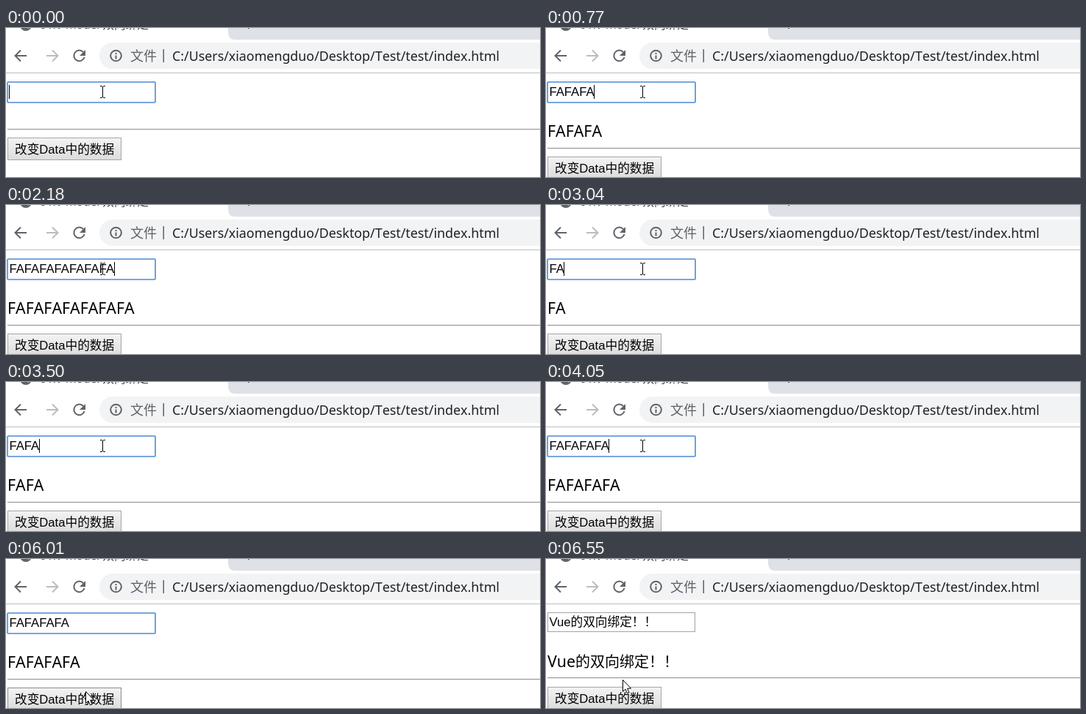
Recreate the animation shown at these times as an HTML page. Size 726 by 204 pixels, loop 7.01 s.

```html
<!DOCTYPE html>
<html lang="zh-CN">
<head>
<meta charset="utf-8">
<title>v-model</title>
<style>
  html, body { margin: 0; width: 100%; height: 100%; overflow: hidden; background: #fff; }
  svg { display: block; }
  text { white-space: pre; }
  .ui { font-family: "Noto Sans", "Noto Sans CJK SC", "Noto Sans CJK", sans-serif; font-kerning: none; }
  .form { font: 16.667px "Liberation Sans", "Noto Sans CJK SC", "Noto Sans CJK", sans-serif; }
  .icon { fill: none; stroke: #5f6368; stroke-width: 2; }
  .solid { fill: #5f6368; }
</style>
</head>
<body>
<svg width="726" height="204" viewBox="0 0 726 204">
  <defs>
    <linearGradient id="face" x2="0" y2="1">
      <stop stop-color="#f3f3f3"/><stop offset="1" stop-color="#dcdcdc"/>
    </linearGradient>
    <path id="back" d="M15 0H0M7 -7.5L-.5 0 7 7.500"/>
  </defs>

  <!-- browser frame -->
  <path d="M302 0V6Q302 16 312 16H726V0Z" fill="#dee1e6"/>
  <path d="M329 0h2v1h-2z" class="solid"/>
  <circle cx="27" cy="-4" r="7" class="icon"/>
  <path d="M22 0l4-3 5 2-2 4h-4z" class="solid"/>
  <text x="46" y="1" class="ui" font-size="15.6" fill="#45494d">01.v-model 双向绑定</text>
  <use href="#back" x="13" y="38" class="icon"/>
  <use href="#back" class="icon" style="stroke:#babcbe" transform="translate(70 38) scale(-1 1)"/>
  <path d="M105 33A7.3 7.3 0 1 0 106.6 40" class="icon"/>
  <path d="M108 30v8h-8z" class="solid"/>
  <rect x="127" y="20" width="640" height="36" rx="18" fill="#f1f3f4"/>
  <circle cx="149.500" cy="38" r="7.300" class="icon"/>
  <path d="M148.500 34h2v2h-2zm0 3.500h2v5h-2z" class="solid"/>
  <text x="169" y="45" class="ui solid" font-size="18">文件</text>
  <path d="M213.500 29h1.500v18h-1.500z" class="solid"/>
  <text x="226" y="45" class="ui" font-size="17.84" fill="#202124">C:/Users/xiaomengduo/Desktop/Test/test/index.html</text>
  <path d="M0 61h726v1H0z" fill="#bcbcbc"/>

  <!-- page -->
  <rect id="box" fill="#fff"/>
  <text id="value" x="4.5" class="form"></text>
  <rect id="caret" y="78" width="1" height="19"/>
  <text id="echo" x="2" class="ui" font-size="21.3"></text>
  <g id="rule">
    <path d="M2 0H726v1H2z" fill="#979797"/>
    <path d="M2 1H726v1H2z" fill="#ececec"/>
  </g>
  <g id="button" stroke="#a6a6a6">
    <rect x="2.500" y=".5" width="154" height="30" fill="url(#face)"/>
    <text x="12" y="22" class="form" stroke="none">改变Data中的数据</text>
  </g>

  <!-- pointers -->
  <path id="beam" d="M-3 -7.500H-1L.5 -6.500 2 -7.500H4M.5 -6.500V7.500M-3 8.500H-1L.5 7.500 2 8.500H4" fill="none" stroke="#000"/>
  <path id="arrow" d="M.5 .5V16.500L4 13.200 6.500 19 9 18 6.600 12.200H11.500Z" fill="#fff" stroke="#000"/>
</svg>
<script>
const LOOP = 7010, TICK = 77.8;
const TYPED = 24, ERASE = 34, RETYPE = 40, RETYPED = 52, BLUR = 79, CLICK = 80;

const $ = id => document.getElementById(id);
const set = (id, attrs) => {
  for (const k in attrs) $(id).setAttribute(k, attrs[k]);
};
const place = (id, x, y) => set(id, { transform: `translate(${x} ${y})` });
const show = (id, on) => set(id, { visibility: on ? "visible" : "hidden" });

// F and A are struck in turn, each at a steady pace.
const presses = ticks => Math.max(0, Math.ceil(ticks / 3.3));
const burst = (tick, f, a, max) => Math.min(max, presses(tick - f) + presses(tick - a));

function letters(tick) {
  if (tick > RETYPE) return burst(tick - RETYPE, 0.05, 1.45, 8);
  if (tick > ERASE) return Math.max(0, Math.round(14 - 2.4 * (tick - ERASE)));
  return tick >= 28 ? 14 : burst(tick, 0.75, 2.85, 15);
}

function caretOn(tick) {
  const idle = tick >= RETYPED ? tick - RETYPED : tick <= ERASE ? tick - TYPED : 0;
  return tick < BLUR && Math.floor(idle / 7) % 2 !== 1;
}

// smooth 0 to 1 between two ticks
function glide(tick, from, to) {
  const p = Math.min(1, Math.max(0, (tick - from) / (to - from)));
  return p * p * (3 - 2 * p);
}

function mouse(tick) {
  const rise = glide(tick, 66, 68), fall = glide(tick, 71, 77), leave = glide(tick, 83, 84);
  return [131 + 13 * rise - 35 * fall - 4 * leave, 87 - 11 * rise + 105 * fall - 16 * leave].map(Math.round);
}

function draw(t) {
  const tick = Math.floor((t + 10) / TICK);
  const clicked = tick >= CLICK, up = clicked ? 1 : 0;
  const n = letters(tick), typed = "FA".repeat(8).slice(0, n);

  set("box", tick < BLUR
    ? { x: 2, y: 74, width: 201, height: 28, rx: 1, stroke: "#4b8ad6", "stroke-width": 1.6 }
    : { x: 2.5, y: 74.5 - up, width: 200, height: 27 - up, rx: 0, stroke: "#a3a3a3", "stroke-width": 1 });
  $("value").textContent = clicked ? "Vue的双向绑定！！" : typed;
  set("value", { y: 93 - up });
  $("echo").innerHTML = clicked ? 'Vue<tspan font-size="20">的双向绑定！！</tspan>' : typed;
  set("echo", { y: 149 - up });
  set("caret", { x: Math.floor(4.5 + (n ? $("value").getComputedTextLength() : 0)) });
  show("caret", caretOn(tick));

  const line = n ? 164 : 138, top = line + 12 - up;
  place("rule", 0, line - 2 * up);
  place("button", 0, top);

  const [x, y] = mouse(tick), inField = y < 102;
  set("button", { stroke: y >= top ? "#8c8c8c" : "#a6a6a6" });
  place("beam", x, y);
  place("arrow", x - 1, y);
  show("beam", inField);
  show("arrow", !inField);
}

const start = performance.now();
function tick() {
  draw((performance.now() - start) % LOOP);
  requestAnimationFrame(tick);
}
tick();
</script>
</body>
</html>
```
